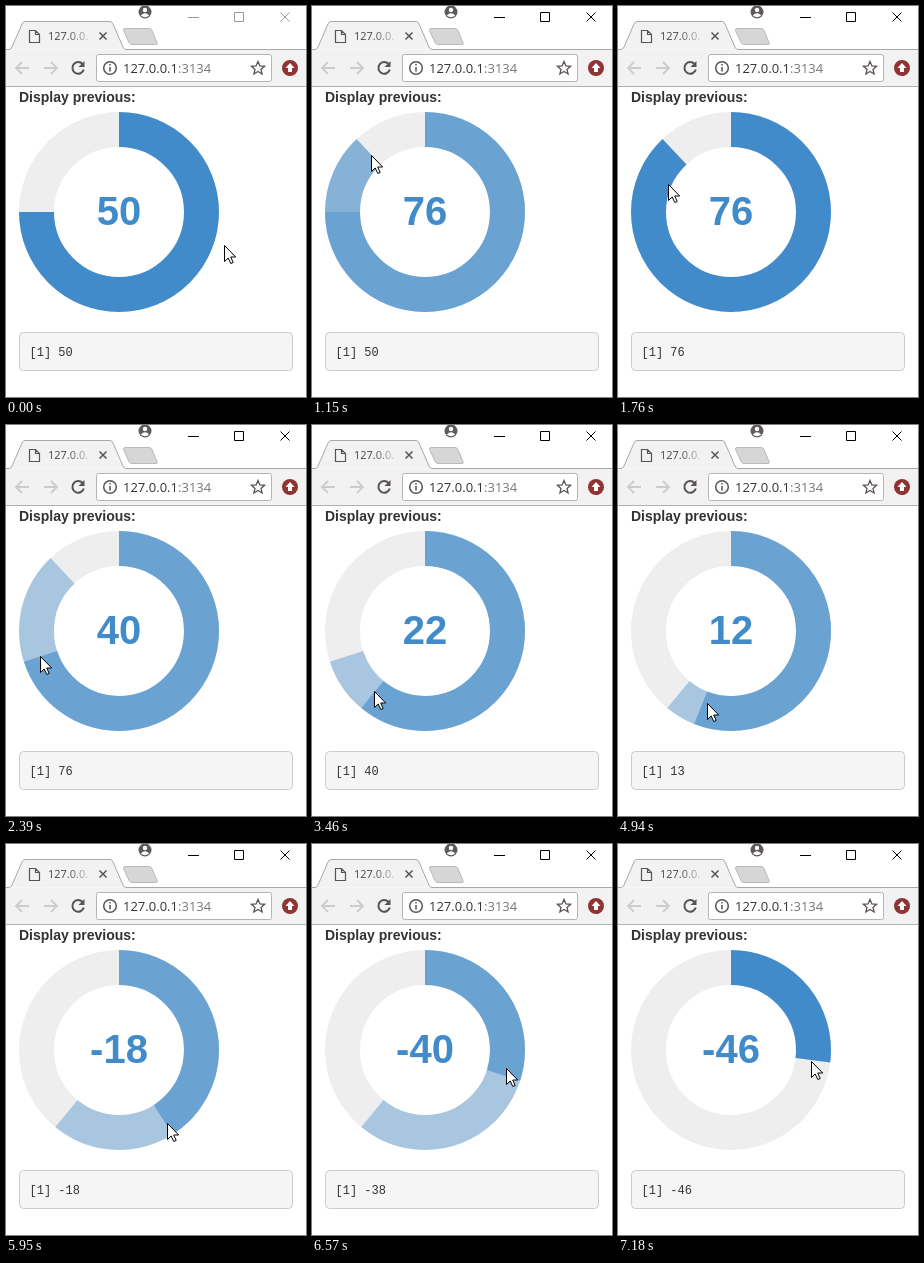
Recreate the animation shown at these times as an HTML page. Size 300 by 391 pixels, loop 8190 ms.

```html
<!DOCTYPE html>
<html lang="en">
<head>
<meta charset="utf-8">
<title>Knob input</title>
<style>
  html, body { margin: 0; width: 100%; height: 100%; overflow: hidden; background: #fff; }
  svg { display: block; }
  .ui { font-family: "Open Sans", "Noto Sans", sans-serif; }
  .label { font: bold 14px "Liberation Sans", Arial, sans-serif; fill: #333; }
  .value { font: bold 40px "Liberation Sans", Arial, sans-serif; fill: #428bca; text-anchor: middle; }
  .output { font: 12px "Liberation Mono", monospace; fill: #333; white-space: pre; }
  .ring circle { fill: none; stroke: #428bca; stroke-width: 35; }
  .line { fill: none; stroke: #5a5252; stroke-width: 1.5; }
</style>
</head>
<body>
<svg width="300" height="391" viewBox="0 0 300 391">
  <!-- title bar and tabs -->
  <rect width="300" height="391" fill="#fff"/>
  <circle cx="139" cy="6" r="6.5" fill="#5f5a5a"/>
  <circle cx="139" cy="4" r="2.2" fill="#fff"/>
  <path d="M134.8 9.5q4.2-4.5 8.4 0-4.2 3.5-8.4 0z" fill="#fff"/>
  <path id="buttons" d="M182 11.5h11M228.5 6.5h9v9h-9zM274.5 6.5l9 9M283.5 6.5l-9 9" fill="none"/>
  <rect y="44" width="300" height="36" fill="#f2f2f2"/>
  <path d="M0 43.5H3q2 0 3-2.500L16 18q1-2.500 3-2.500H104q2 0 3 2.500L117 41q1 2.500 3 2.500H300" fill="#f2f2f2" stroke="#a8a8a8"/>
  <path d="M119 22.500H143q2 0 3 2l5 12q1 2-1 2H126q-2 0-3-2l-5.500-12q-.5-2 1.500-2z" fill="#d6d6d6" stroke="#bababa"/>
  <path class="line" style="stroke-width:1.2" d="M23.500 24.500h6l4 4v8h-10zM29.500 24.500v4h4"/>
  <text class="ui" x="42" y="34" font-size="11" fill="url(#fade)">127.0.0.</text>
  <path class="line" d="M93.500 26.500l7 7M100.500 26.500l-7 7"/>
  <linearGradient id="fade" gradientUnits="userSpaceOnUse" x1="62" x2="86">
    <stop stop-color="#444"/><stop offset="1" stop-color="#444" stop-opacity=".1"/>
  </linearGradient>

  <!-- toolbar -->
  <path d="M23 62H10.500M16 56l-6 6 6 6M38 62H50.500M45 56l6 6-6 6" fill="none" stroke="#ccc" stroke-width="1.800"/>
  <path class="line" style="stroke-width:2" d="M76.500 58a5.800 5.800 0 1 0 1.300 5.500"/>
  <path d="M78.500 55v6h-6z" fill="#5a5252"/>
  <rect x="90.500" y="48.500" width="175" height="27" rx="2" fill="#fff" stroke="#b4b4b4"/>
  <circle class="line" cx="104" cy="62" r="6.300"/>
  <path class="line" d="M104 61v4.500M104 58v1.600"/>
  <text class="ui" x="117" y="67" font-size="13" fill="#333">127.0.0.1<tspan fill="#777">:3134</tspan></text>
  <path class="line" style="stroke-width:1.300" d="M252 55.500l1.900 4.400 4.700.4-3.600 3.100 1.100 4.600-4.100-2.500-4.100 2.500 1.100-4.600-3.600-3.100 4.700-.4z"/>
  <circle cx="284" cy="62" r="8" fill="#8f3333"/>
  <path d="M284 57l4.500 5h-2.500v4h-4v-4h-2.500z" fill="#fff"/>
  <path d="M0 80.500H300" stroke="#b0b0b0"/>

  <!-- page -->
  <text class="label" x="13" y="96">Display previous:</text>
  <g class="ring" transform="rotate(-90 113 206)">
    <circle cx="113" cy="206" r="82.500" style="stroke:#eee"/>
    <circle id="before" cx="113" cy="206" r="82.500" pathLength="100" opacity=".4"/>
    <circle id="now" cx="113" cy="206" r="82.500" pathLength="100"/>
  </g>
  <text id="value" class="value" x="113" y="219"></text>
  <rect x="13.500" y="326.500" width="273" height="38" rx="4" fill="#f5f5f5" stroke="#ccc"/>
  <text id="output" class="output" x="23.500" y="350"></text>
  <path id="cursor" d="M.5.5V16.500l3.700-3.500 2.600 5.500 2.400-1-2.500-5.500h5z" fill="#fff" stroke="#000"/>
</svg>
<script>
const LOOP = 8190, DRAG = 4710, DROP = 6950, STEPS = 29;
const $ = id => document.getElementById(id);

// press time, release time, value on release
const clicks = [[0, 0, 50], [1150, 1300, 76], [2390, 2540, 40], [3460, 3630, 22], [4560, 7180, -46]];
// start, end, steps, end position of the pointer
const moves = [[210, 830, 9, 59, 149], [1530, 2220, 10, 34, 231], [2690, 3310, 9, 62, 266],
  [3630, 3780, 3, 64, 268], [4020, 4240, 4, 72, 273]];
// time, value under the pointer, distance from the centre
const drag = [[4710, 17.5, 78.5], [4942, 10.2, 76], [5490, -67, 82], [5600, -82, 82], [5840, -18.4, 87],
  [5990, -18.4, 87.3], [6340, -32, 84], [6800, -55, 81], [6950, -45.7, 80.7]];

const clamp = (x, lo, hi) => Math.min(hi, Math.max(lo, x));
const mix = (a, b, p) => a + (b - a) * p;
const percent = v => (v + 100) / 2;

function dragAt(t) {
  t = clamp(t, DRAG, DROP);
  const i = Math.max(1, drag.findIndex(k => k[0] >= t));
  const [a, b] = [drag[i - 1], drag[i]];
  const p = (t - a[0]) / (b[0] - a[0]);
  return { value: mix(a[1], b[1], p), radius: mix(a[2], b[2], p) };
}

// the screen refreshes in even steps while dragging
function dragTime(t) {
  const step = (DROP - DRAG) / STEPS;
  return DRAG + step * clamp(Math.floor((t - DRAG + 5) / step), 0, STEPS);
}

function pointerAt(t) {
  if (t >= DRAG) {
    const { value, radius } = dragAt(dragTime(t));
    const angle = percent(value) / 50 * Math.PI;
    return [113 + radius * Math.sin(angle), 206 - radius * Math.cos(angle)];
  }
  let x = 218, y = 239;
  for (const [start, end, n, toX, toY] of moves) {
    if (t < start) break;
    const done = Math.floor((t - start) / (end - start) * (n - 1)) + 1;
    const p = clamp(done / n, 0, 1), eased = p * p * (3 - 2 * p);
    x = mix(x, toX, eased);
    y = mix(y, toY, eased);
  }
  return [x, y];
}

function setArc(id, value) {
  $(id).setAttribute("stroke-dasharray", percent(value) + " 200");
}

function draw(t) {
  const i = clicks.findLastIndex(c => t >= c[0]);
  const pressed = t < clicks[i][1];
  const before = i ? clicks[i - 1][2] : 50;
  let value = clicks[i][2], output = pressed ? before : value;
  if (pressed && i === clicks.length - 1) {
    // the knob trails the pointer, the printed value trails the knob
    const now = dragTime(t);
    value = Math.round(dragAt(now - 60).value);
    if (t >= DRAG) output = Math.round(dragAt(now - 100).value);
  }
  setArc("before", before);
  setArc("now", value);
  $("before").style.display = pressed ? "" : "none";
  $("now").setAttribute("opacity", pressed ? 0.6 : 1);
  $("value").textContent = value;
  $("output").textContent = "[1] " + output;
  $("buttons").setAttribute("stroke", t < 1150 ? "#999" : "#000");
  $("cursor").setAttribute("transform", `translate(${pointerAt(t).map(Math.round)})`);
}

const begin = performance.now();
function frame() {
  draw((performance.now() - begin) % LOOP);
  requestAnimationFrame(frame);
}
frame();
</script>
</body>
</html>
```
